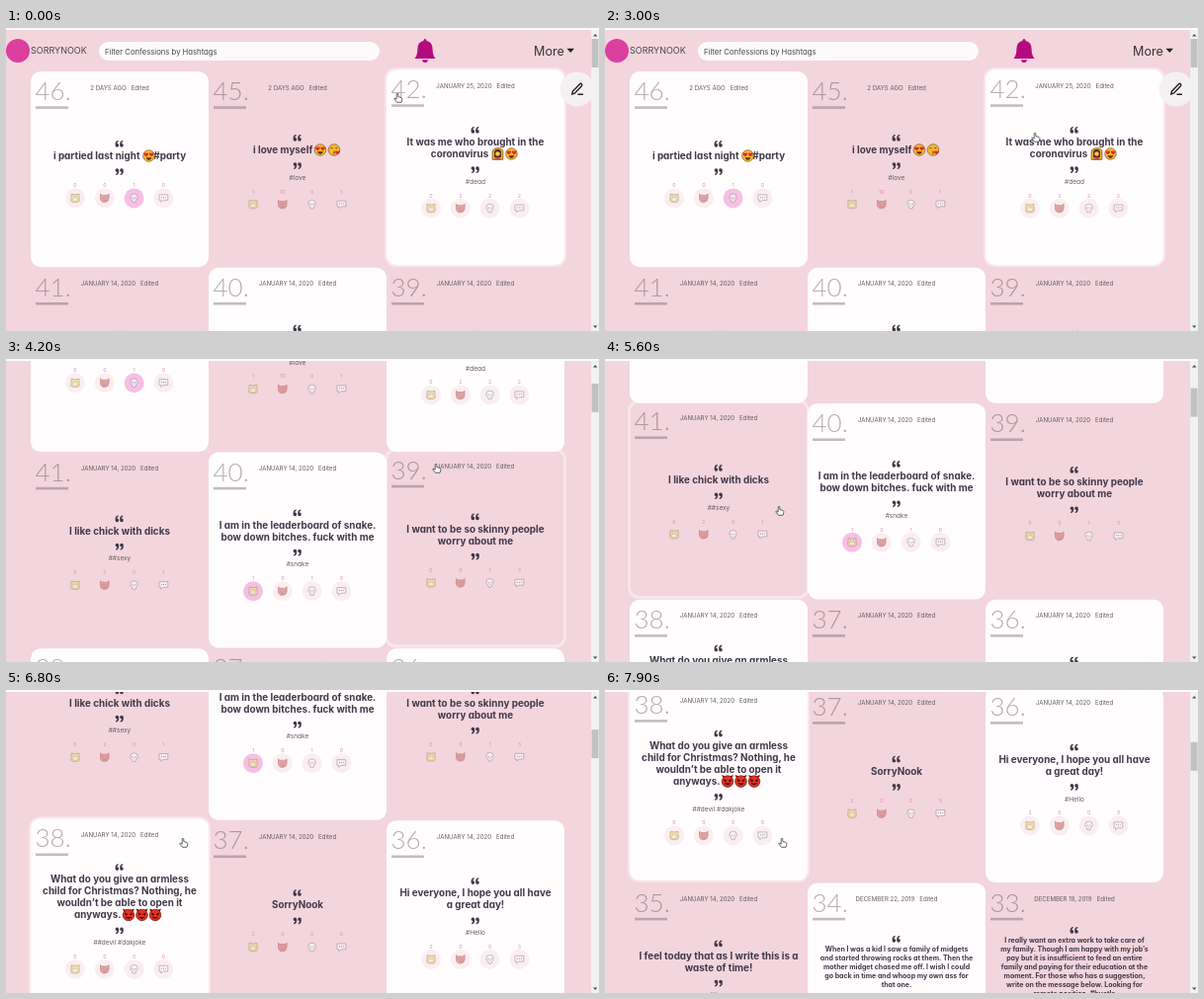
An HTML page for the animation above (8000 ms loop, 600x307 px).

```html
<!DOCTYPE html>
<html lang="en">
<head>
<meta charset="utf-8">
<title>Confession wall</title>
<style>
  html, body { margin: 0; width: 100%; height: 100%; overflow: hidden; background: #fff; }
  svg { display: block; width: 600px; height: 307px; }
  text { font-family: Inter, Lato, sans-serif; font-feature-settings: "cv11"; fill: #4b464d; }
  .mid text, text.mid { text-anchor: middle; }
  .number { font: 300 26px Lato, sans-serif; fill: #5a4a55; fill-opacity: .45; }
  .date { font-size: 6.1px; fill: #625b64; }
  .quote { font-size: 9.9px; font-weight: 700; fill: #40384a; }
  .small { font-size: 7px; font-weight: 700; fill: #40384a; }
  .tag { font-size: 6.5px; fill: #625b64; }
  .count { font-size: 5.3px; fill: #e58bb0; }
</style>
</head>
<body>
<svg viewBox="0 0 600 307">
  <defs>
    <g id="mark" fill="#40384a">
      <path id="comma" d="M-.5 1.4a1.8 1.8 0 1 1-3.6 0V-.2Q-4-3.2-1-3.5v1.3Q-2.3-1.9-2.4-.4A1.8 1.8 0 0 1-.5 1.4z"/>
      <use href="#comma" x="4.6"/>
    </g>
    <g id="face"><circle r="5.8" fill="#f7b92f" stroke="#6b4518" stroke-width=".6"/></g>
    <path id="heart" d="M0 2.3C-3.6-.2-2.4-2.6 0-1 2.4-2.6 3.6-.2 0 2.3z" fill="#e3262e"/>
    <g id="love">
      <use href="#face"/>
      <use href="#heart" x="-2.7" y="-1.6"/><use href="#heart" x="2.7" y="-1.6"/>
      <path d="M-3 1.8h6Q2 4.6 0 4.6T-3 1.8z" fill="#5d3014"/>
    </g>
    <g id="kiss">
      <use href="#face"/>
      <path d="M-3.6-1.5q1.2-1 2.3 0M1.3-1.8h2M-.5 1.2q2 .8 0 1.5 2 .7 0 1.4" fill="none" stroke="#5d3014" stroke-width=".9"/>
      <use href="#heart" x="3.5" y="2.4"/>
    </g>
    <g id="arms">
      <path d="M-5.4 5.8V-2Q-5-5.6 0-5.8T5.4-2v7.8z" fill="#f4ae2b" stroke="#6b4518" stroke-width=".7"/>
      <path d="M-3.4 3.5v-5a3.4 3 0 0 1 6.8 0v5z" fill="#4b2a18"/>
      <circle r="2.3" fill="#f9c94b"/>
      <path d="M-3.2 6q.3-2.4 3.2-2.4T3.2 6z" fill="#c0453c"/>
    </g>
    <g id="imp">
      <path d="M-5.8-6.2q0 3 2.5 3.6L-1.7-4.8zM5.8-6.2q0 3-2.5 3.6L1.7-4.8z" fill="#8c1713"/>
      <circle r="5.8" cy=".3" fill="#e5301f" stroke="#611" stroke-width=".7"/>
      <path d="M-3.7-1.8l2.7 1.3-1.9 1zM3.7-1.8L1-.5l1.9 1zM-3 2.2Q0 5.2 3 2.2" fill="#2b0a0a" stroke="#2b0a0a" stroke-width=".5"/>
    </g>
    <g id="react0" stroke="#9b8f77" stroke-width=".7">
      <path d="M-4-4.2Q0-2.8 4-4.200v3.400q1 4.800-1.600 4.900h-4.800Q-5 4-4-.8z" fill="#f2dd92"/>
      <rect x="-2.6" y="-.6" width="5.2" height="3.600" rx="1.5" fill="#f8efd0" stroke-width=".4"/>
      <path d="M-1.8-1.800h.6M1.2-1.800h.6"/>
    </g>
    <g id="react1" stroke="#b1696b" stroke-width=".7">
      <path d="M-4.3-4.4Q-3-2.7-1.8-3H1.8Q3-2.7 4.3-4.4V.2Q4 4 0 4.2T-4.3.2z" fill="#da8b8a"/>
      <path d="M-2.4-.6l1.4.6M2.4-.6L1 0M-1.6 2.2h3.2"/>
    </g>
    <g id="react2" stroke="#8f878d" stroke-width=".7">
      <path d="M-3.7-1a3.7 3.4 0 0 1 7.4 0Q3.8 1 2.2 1.8L1.5 4.2h-3L-2.2 1.8Q-3.8 1-3.7-1z" fill="#faf6f7"/>
      <path d="M-2-.3h1.2M.8-.3H2M0 1.2v.7" stroke-width="1.1"/>
    </g>
    <g id="react3" stroke="#8f878d" stroke-width=".7">
      <path d="M-4.4-3.6h8.8v5.8H-.6L-2.6 4.2v-2h-1.8z" fill="#fbf3f6"/>
      <path d="M-2.4-.7h1M-.5-.7h1M1.4-.7h1" stroke-width="1.1"/>
    </g>
  </defs>
  <rect width="600" height="307" fill="#f3d5dd"/>
  <g id="page">
    <circle cx="12" cy="23" r="12" fill="#dc3f9f"/>
    <text x="25" y="26" font-size="9">SORRYNOOK</text>
    <rect x="94" y="14" width="284" height="19" rx="9.5" fill="#fefafb"/>
    <text x="100" y="26.5" font-size="7.7">Filter Confessions by Hashtags</text>
    <path d="M424 11q1.6 0 1.6 2 6 1.4 6 8.2 0 6.5 3 9.8H413.4q3-3.3 3-9.8 0-6.8 6-8.2 0-2 1.6-2zM421 32.2h6q-.5 2.8-3 2.8t-3-2.8z" fill="#b50a7c"/>
    <text x="534" y="28" font-size="12.6" style="fill:#333">More</text>
    <path d="M567.5 20.8h7.5l-3.75 4.2z" fill="#222"/>
    <g id="cards"></g>
    <circle cx="578" cy="62" r="17.5" fill="#f5f1f3"/>
    <path d="M572.8 67l.7-3 7-7.3q1-.8 1.9.1t0 1.9l-7 7.5zM578.5 67.3h5.5" fill="none" stroke="#222" stroke-width="1.4"/>
  </g>
  <rect width="600" height="2" fill="#fdfdfd"/>
  <rect x="592" y="2" width="8" height="305" fill="#f1f1f1"/>
  <path d="M594 8.5l2.2-2.5 2.2 2.5zM594 301.5l2.2 2.5 2.2-2.5z" fill="#505050"/>
  <rect id="thumb" x="592.5" y="11" width="7" height="29" fill="#c1c1c1"/>
  <path id="hand" d="M-.9.9Q0-.6.9.9V4L4.6 5q1 .5.8 2L4.5 10.3H-.6L-3.6 6.5Q-3.5 5.3-2.3 5.7L-.9 7z" fill="#fff" stroke="#444" stroke-width=".9"/>
</svg>
<script>
const LOOP = 8000, FRAME = 100;
const TOP = 44, PITCH = 198.7, CARD_W = 180, CARD_H = 198.3;
const JAN = 'JANUARY 14, 2020';
const GAP = '\u2003';   // room for an emoji inside a line

// emojis: [symbol, x in card, line]
const posts = [
  { n: 46, date: '2 DAYS AGO', lines: [`i partied last night ${GAP}\u2009#party`], emojis: [['love', 119.5, 0]], counts: [0, 0, 1, 0], picked: 2 },
  { n: 45, date: '2 DAYS AGO', lines: ['i love myself' + GAP.repeat(3)], emojis: [['love', 113, 0], ['kiss', 127, 0]], tag: '#love', counts: [1, 10, 0, 1] },
  { n: 42, date: 'JANUARY 25, 2020', lines: ['It was me who brought in the', 'coronavirus ' + GAP.repeat(3)], emojis: [['arms', 112.5, 1], ['love', 126.5, 1]], tag: '#dead', counts: [0, 2, 2, 2] },
  { n: 41, date: JAN, lines: ['I like chick with dicks'], tag: '##sexy', counts: [0, 2, 0, 1] },
  { n: 40, date: JAN, lines: ['I am in the leaderboard of snake.', 'bow down bitches. fuck with me'], tag: '#snake', counts: [1, 0, 1, 0], picked: 0 },
  { n: 39, date: JAN, lines: ['I want to be so skinny people', 'worry about me'], counts: [0, 0, 1, 3] },
  { n: 38, date: JAN, lines: ['What do you give an armless', 'child for Christmas? Nothing, he', 'wouldn’t be able to open it', 'anyways.' + GAP.repeat(4) + '\u2002'], emojis: [['imp', 99, 3], ['imp', 112.5, 3], ['imp', 126, 3]], tag: '##devil #dakjoke', counts: [0, 0, 0, 0] },
  { n: 37, date: JAN, lines: ['SorryNook'], counts: [2, 0, 0, 0] },
  { n: 36, date: JAN, lines: ['Hi everyone, I hope you all have', 'a great day!'], tag: '#Hello', counts: [2, 0, 0, 3] },
  { n: 35, date: JAN, lines: ['I feel today that as I write this is a', 'waste of time!'], tag: '#time', counts: [0, 0, 0, 0] },
  { n: 34, date: 'DECEMBER 22, 2019', small: 57, lines: ['When I was a kid I saw a family of midgets', 'and started throwing rocks at them. Then the', 'mother midget chased me off. I wish I could', 'go back in time and whoop my own ass for', 'that one.'], counts: [0, 0, 0, 0] },
  { n: 33, date: 'DECEMBER 18, 2019', small: 48, lines: ['I really want an extra work to take care of', 'my family. Though I am happy with my job’s', 'pay but it is insufficient to feed an entire', 'family and paying for their education at the', 'moment. For those who has a suggestion,', 'write on the message below. Looking for', 'remote position. #hustle'], counts: [0, 0, 0, 0] }
];

const label = (cls, x, y, s) => `<text class="${cls}" x="${x}" y="${y}">${s}</text>`;
const use = (id, x, y, extra = '') => `<use href="#${id}" transform="translate(${x} ${y}) ${extra}"/>`;
const cardX = i => 25 + CARD_W * (i % 3);
const cardY = i => TOP + PITCH * Math.floor(i / 3);

function cardMarkup(post, i) {
  const white = i % 2 === 0, small = post.small;
  const step = small ? 9 : 12;
  const open = small || 73.5 - 6 * (post.lines.length - 1) - (post.tag ? 6 : 0);
  const first = open + (small ? 10.5 : 12);
  const close = first + step * (post.lines.length - 1) + 16;
  const countY = close + (post.tag ? 26 : 13.7);
  const iconY = countY + 13.2;
  let out = `<rect class="glow" x="-.5" y="-.5" width="181" height="199" rx="10" fill="none" stroke="#fff" stroke-width="3"/>`;
  if (white) out += `<rect width="${CARD_W}" height="${CARD_H}" rx="10" fill="#fffdfe"/>`;
  out += label('number', 4.5, 29.2, post.n + '.')
    + `<rect x="5" y="35.3" width="33" height="2.6" fill="#5a4a55" fill-opacity=".36"/><g class="mid">`
    + label('date', 90, 18.6, `${post.date}<tspan dx="5">Edited</tspan>`)
    + use('mark', 89.7, open)
    + post.lines.map((s, k) => label(small ? 'small' : 'quote', 90, first + step * k + (small ? 2.5 : 3.6), s)).join('')
    + (post.emojis || []).map(([id, x, k]) => use(id, x, first + step * k)).join('')
    + use('mark', 89.7, close, 'rotate(180)');
  if (post.tag) out += label('tag', 90, close + 14.4, post.tag);
  post.counts.forEach((c, k) => {
    const x = 45 + 29.8 * k, picked = post.picked === k;
    out += label('count', x, countY + 2, c);
    if (white) out += `<circle cx="${x}" cy="${iconY}" r="10" fill="${picked ? '#f6bfe5' : '#faeef1'}"/>`;
    out += `<g opacity=".75">${use('react' + k, x, iconY)}</g>`;
  });
  return `<g class="card">${out}</g></g>`;
}

const $ = id => document.getElementById(id);
$('cards').innerHTML = posts.map(cardMarkup).join('');
const cards = [...document.querySelectorAll('.card')];
const glows = cards.map(c => c.querySelector('.glow'));

const clamp = v => Math.min(1, Math.max(0, v));
const ease = p => p * p * (3 - 2 * p);

// Wheel notches, each easing the page by one step
const NOTCHES = [3100, 3450, 3800, 4250, 5750, 6090, 6700, 7400, 7600];
const scrollAt = t => NOTCHES.reduce((sum, start) => sum + 49.4 * ease(clamp((t - start) / 300)), 0);

// Pointer tip: [time, x, y]
const PATH = [
  [0, 396, 66], [900, 133, 140], [1300, 100, 118], [1800, 499, 33],
  [2250, 7, 12], [2700, 430, 100], [3000, 435, 106], [4500, 435, 106],
  [5400, 176, 149], [5600, 176, 149], [5900, 179, 150], [LOOP, 179, 150]
];
function pointerAt(t) {
  const k = Math.max(1, PATH.findIndex(p => p[0] >= t));
  const [t0, x0, y0] = PATH[k - 1], [t1, x1, y1] = PATH[k];
  const p = ease(clamp((t - t0) / (t1 - t0)));
  return [x0 + (x1 - x0) * p, y0 + (y1 - y0) * p];
}

function hoveredAt(t) {
  const [x, y] = pointerAt(t), pageY = y + scrollAt(t);
  return posts.findIndex((_, i) => x >= cardX(i) && x < cardX(i) + CARD_W
    && pageY >= cardY(i) && pageY < cardY(i) + CARD_H);
}

function draw(t) {
  const scroll = scrollAt(t);
  $('page').setAttribute('transform', `translate(0 ${-scroll})`);
  $('thumb').setAttribute('y', 11 + scroll * .094);
  $('hand').setAttribute('transform', `translate(${pointerAt(t)}) scale(.9)`);
  // Averaging recent hovers gives the short lift transition
  const recent = [0, 50, 100, 150].map(d => hoveredAt(Math.max(0, t - d)));
  cards.forEach((card, i) => {
    const lift = recent.filter(h => h === i).length / recent.length;
    card.setAttribute('transform', `translate(${cardX(i)} ${cardY(i) - 2 * lift})`);
    glows[i].setAttribute('opacity', .4 * lift);
  });
}

const begin = performance.now();
function tick() {
  const t = (performance.now() - begin) % LOOP;
  draw(Math.floor(t / FRAME) * FRAME);
  requestAnimationFrame(tick);
}
tick();
</script>
</body>
</html>
```
